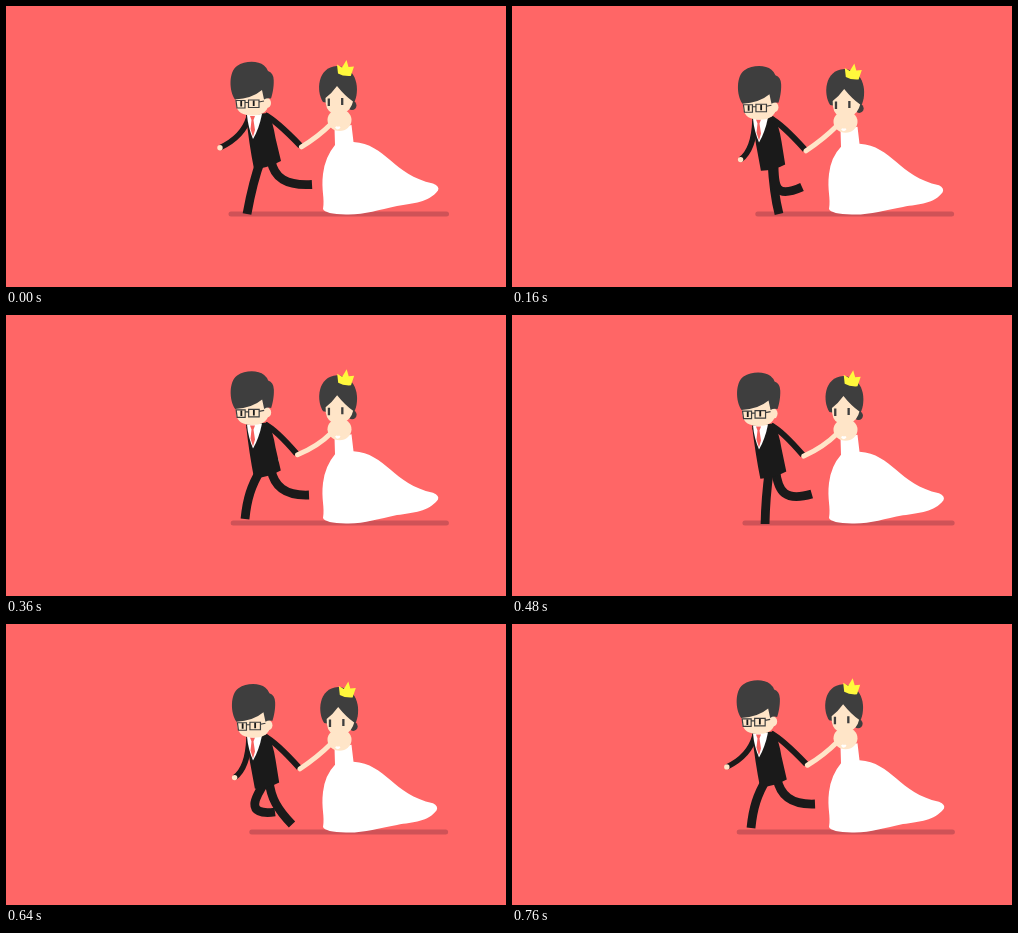
An HTML page with a canvas that plays this animation: 500 by 281 pixels, repeating every 0.8 s.

```html
<!DOCTYPE html>
<html lang="en">
<head>
<meta charset="utf-8">
<title>Running couple</title>
<style>
  html, body { margin: 0; height: 100%; overflow: hidden; background: #ff6666; }
  canvas { display: block; }
</style>
</head>
<body>
<canvas id="stage" width="500" height="281"></canvas>
<script>
const ctx = document.getElementById('stage').getContext('2d');
const LOOP = 800, STEP = 40;
const BLACK = '#1a1a1a', HAIR = '#3e3e3e', SKIN = '#ffe5c8', GOLD = '#fff83c', RED = '#f8625f';

// One leg's stride: time, hip x, upper control, lower control, foot
const STRIDE = [
  [0,   255, 248, 172, 245, 186, 241, 208],
  [160, 260, 261, 176, 262, 188, 267, 208],
  [240, 263, 265, 174, 271, 185, 286, 200.5],
  [360, 265, 268, 171, 279, 181, 303, 180],
  [400, 265, 268, 172, 280, 180, 306, 178.5],
  [560, 262, 262, 181, 263, 193, 290, 181],
  [640, 260, 249, 173, 238, 192, 269, 188],
  [760, 255, 245, 171, 241, 184, 239, 204],
];

// Smooth cyclic interpolation through the stride keys
function stride(time) {
  const t = time % LOOP, n = STRIDE.length;
  const i = STRIDE.findLastIndex(k => k[0] <= t);
  const key = j => {
    const k = STRIDE[(j + n) % n].slice();
    k[0] += Math.floor(j / n) * LOOP;
    return k;
  };
  const [a, b, c, d] = [key(i - 1), key(i), key(i + 1), key(i + 2)];
  const span = c[0] - b[0], u = (t - b[0]) / span;
  return b.slice(1).map((p, j) => {
    const q = c[j + 1];
    const m0 = (q - a[j + 1]) / (c[0] - a[0]) * span;
    const m1 = (d[j + 1] - p) / (d[0] - b[0]) * span;
    return p + u * (m0 + u * (3 * (q - p) - 2 * m0 - m1 + u * (2 * (p - q) + m0 + m1)));
  });
}

function fill(color, d) {
  ctx.fillStyle = color;
  ctx.fill(new Path2D(d));
}

function line(color, width, d, cap = 'butt') {
  ctx.strokeStyle = color;
  ctx.lineWidth = width;
  ctx.lineCap = cap;
  ctx.stroke(new Path2D(d));
}

function oval(color, x, y, rx, ry = rx) {
  ctx.fillStyle = color;
  ctx.beginPath();
  ctx.ellipse(x, y, rx, ry, 0, 0, 2 * Math.PI);
  ctx.fill();
}

function shifted(x, y, paint) {
  ctx.save();
  ctx.translate(x, y);
  paint();
  ctx.restore();
}

function drawLeg(t, bob) {
  const [hip, x1, y1, x2, y2, x, y] = stride(t);
  line(BLACK, 8.8, `M${hip} ${154 + 3 * bob} C${x1} ${y1} ${x2} ${y2} ${x} ${y}`);
}

function drawFreeArm(s, bob) {
  const x = 237 - 29 * s + 6 * s * s, y = 155.2 - 1.5 * s - 12 * s * s;
  line(BLACK, 5.6, `M243 ${111 + 4 * bob} Q${244 - 7 * s} ${145 - 14 * s * s} ${x} ${y}`);
  oval(SKIN, x, y, 2.7);
}

function drawSuit(b) {
  const top = 4 * b;
  fill(BLACK, `M240 ${109 + top} L262 ${107 + top} Q267 ${116 + top} 269.5 ${132 + top}
    L${275 - 2 * b} ${155 + 4 * b} Q262 ${162 + 3 * b} ${248 + b} ${163 + 2 * b}
    Q${243 + b} ${138 + 2 * b} 240 ${109 + top}Z`);
  shifted(0, top, () => {
    fill('#fff', 'M241 109 L256 108 Q253 123 247 133 Q242 121 241 109Z');
    fill(RED, 'M244 110 L249 110 L247.5 114 L249 124 L247 131 L244.5 123 L245.5 114Z');
  });
}

function drawGroomHead() {
  fill(SKIN, 'M229 80 L230 99 C231 106 237 109.5 246 109.5 C255 109.5 260 106 261.5 102 L262 80Z');
  oval(SKIN, 261, 97, 4, 5);
  fill(HAIR, `M229 93.5 C223 85 222.5 66 231 60 C239 54.5 252 54.5 258 59.5 Q261 62 262 65
    Q267.5 67 267.7 74 C268 81 266.5 88 265 92.5 Q261 91.5 258 93.5 L256 84 Q246 92.5 229 93.5Z`);
  line(HAIR, 1.2, 'M230 94.5 H239 V102 H231Z M242.5 94 H253 V101.5 H242.5Z M239 96.5 H242.5 M253 96 L258 95');
  line(BLACK, 1.8, 'M235.2 95 V100.5 M247.7 94.5 V100');
}

function drawDress(b) {
  const y = 2 * b, tipX = 433 - 1.5 * b, tipY = 181.5 + 2 * b;
  fill('#fff', `M328.5 ${122 + y} L345.5 ${119 + y} L347.5 ${136 + y}
    C380 ${138 + y} 387 ${169 + y} 427 ${177.5 + y} Q${tipX + 1} ${tipY - 1} ${tipX - 1} ${tipY + 3}
    C422 ${197 + b} 408 ${197 + b} 391 ${200 + b} C372 204 358 209 340 208.5 Q319 208 317 203
    C319 192 315 184 317 168 Q319 151 329 ${139 + y}Z`);
  shifted(0, y, () => {
    oval(SKIN, 333.5, 114, 12, 11);
    fill('#fff', 'M329 121.5 Q331 119.5 332 121 Q333 119.5 334.5 121.5 Q333.5 123.5 331 123.5Z');
  });
}

function drawBrideHead() {
  oval(HAIR, 346, 99.5, 4.5);
  fill(HAIR, 'M317 96 C310 86 311 61 331 60 C352 61 354 85 348 97 L343 101Z');
  fill(SKIN, 'M331 80 Q326 87 319.5 92 Q319 104 326 107 L338 107 Q345 104 347 95.5 Q339 90 331 80Z');
  line(HAIR, 2.3, 'M322.8 92.5 V100 M336.2 92 V99');
}

function draw(t) {
  const bob = (1 - Math.cos(4 * Math.PI * t / LOOP)) / 2;
  const swing = Math.cos(2 * Math.PI * t / LOOP);
  const handX = 292.5 + 2 * swing, handY = 139 + 5 * bob + 0.8 * swing;

  ctx.fillStyle = '#ff6666';
  ctx.fillRect(0, 0, 500, 281);
  const left = 225 + 23 * bob, right = 442.5 - bob;
  line('#cf5257', 5, `M${left} 208 H${right - 2}`, 'round');

  drawLeg(t, bob);
  drawLeg(t + LOOP / 2, bob);
  drawFreeArm(swing, bob);
  drawSuit(bob);
  line(BLACK, 6, `M259 ${109 + 4 * bob} Q270 ${114.5 + 4 * bob} ${handX} ${handY}`);
  shifted(1.6 * bob, 4.7 * bob, drawGroomHead);

  drawDress(bob);
  line(SKIN, 5, `M325 ${118 + 2 * bob} Q312 ${131 + 2 * bob} ${handX + 1} ${handY + 1}`, 'round');
  shifted(1.3 * bob, 3.2 * bob, drawBrideHead);
  shifted(2 * bob, 3.8 * bob, () =>
    fill(GOLD, 'M331 58.5 L336 61.5 L340.5 54 L342.5 61 L348 60.5 L344.8 70 Q337 70.5 332 67.5Z'));
}

function tick(now) {
  draw(Math.floor(now % LOOP / STEP) * STEP);
  requestAnimationFrame(tick);
}
requestAnimationFrame(tick);
</script>
</body>
</html>
```
